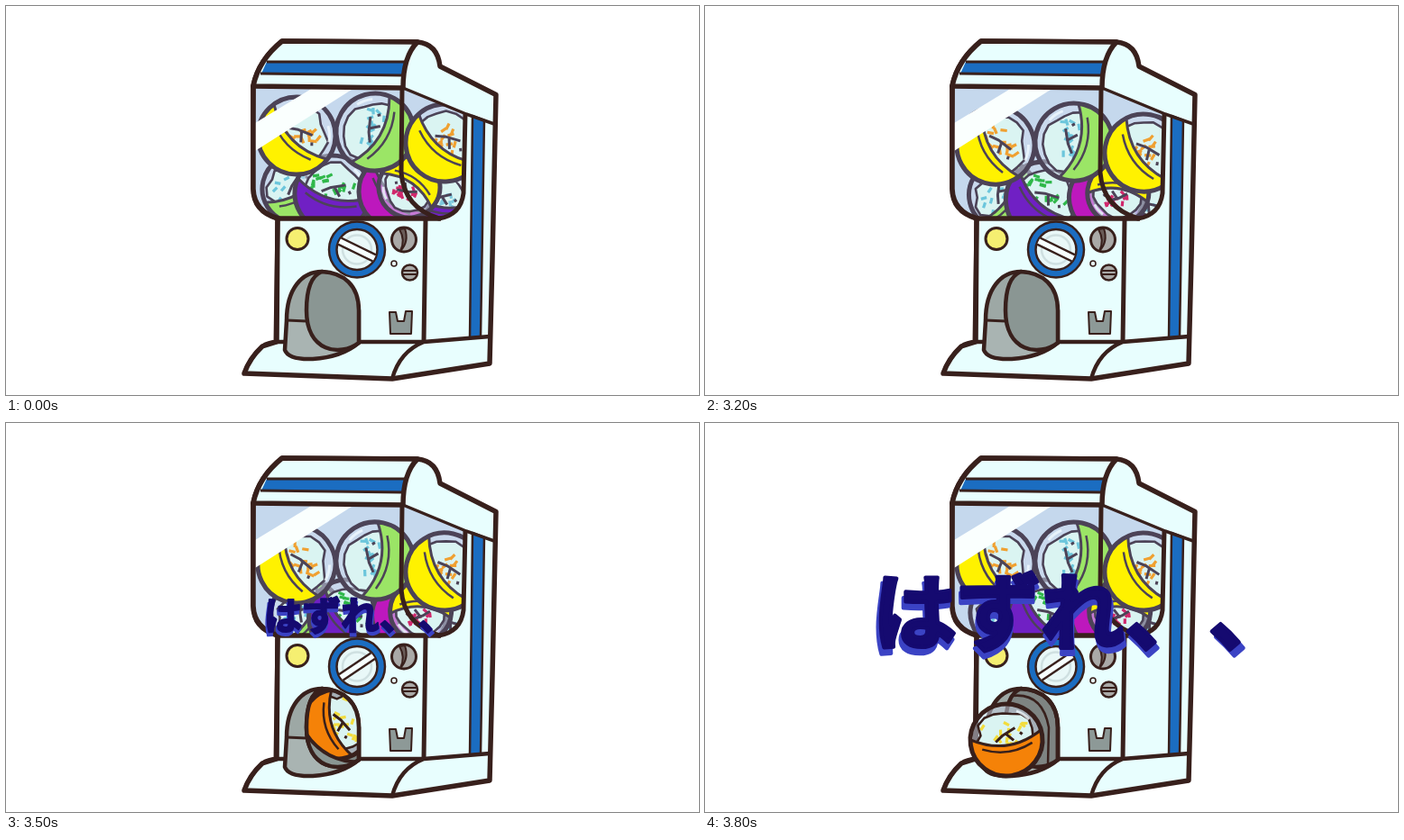
An HTML page with a canvas for the animation above (5.8 s loop, 768 by 432 pixels).

```html
<!DOCTYPE html>
<html lang="ja">
<head>
<meta charset="utf-8">
<title>Capsule machine</title>
<style>
html, body { margin: 0; width: 100%; height: 100%; overflow: hidden; background: #fff; }
canvas { display: block; width: 768px; height: 432px; }
</style>
</head>
<body>
<canvas id="stage" width="768" height="432"></canvas>
<script>
const ctx = document.getElementById('stage').getContext('2d');
const LOOP = 5800, START = 3000, STEP = 100, LAST = 9;
const DROP = 4, SPEAK = 5; // steps at which the prize and the caption appear
const INK = '#38201c', SHADE = '#4c4357', FLAP = '#8a9693';
const BODY = '#e8fefe', BLUE = '#1b6dc1', PALE = '#c5d8ed';
const YELLOW = '#fff200', GREEN = '#9be566', PURPLE = '#7020c4', MAGENTA = '#bd18bd';

// Capsules before the knob turns; the upper row comes last
const CAPSULES = [
  { color: GREEN, speck: '#6cc6dc', x: 322, y: 203, r: 38, angle: -32 },
  { color: PURPLE, speck: '#7cc8dc', x: 482, y: 218, r: 36, angle: 10 },
  { color: PURPLE, speck: '#2fb84a', x: 362, y: 208, r: 42, angle: 15 },
  { color: MAGENTA, speck: '#d0286c', x: 432, y: 206, r: 41, angle: 44 },
  { color: YELLOW, speck: '#d0286c', x: 447, y: 201, r: 34, angle: -145 },
  { color: YELLOW, speck: '#f0a030', x: 322, y: 144, r: 43, angle: 46, upper: true },
  { color: GREEN, speck: '#6cc6dc', x: 409, y: 140, r: 43, angle: -60, upper: true },
  { color: YELLOW, speck: '#f0a030', x: 486, y: 152, r: 43, angle: 40, upper: true }
];
const MARKS = new Path2D('M-.3 .02L-.08 -.14L.28 -.3M.02 -.16L.2 .04M.4 -.16L.46 -.1');

const mix = (a, b, k) => a + (b - a) * k;

function shape(d, fill, width = 0, color = INK) {
  const p = new Path2D(d);
  if (fill) { ctx.fillStyle = fill; ctx.fill(p); }
  if (width) { ctx.strokeStyle = color; ctx.lineWidth = width; ctx.stroke(p); }
  return p;
}

function disc(x, y, r, fill, width = 0, color = INK) {
  ctx.beginPath();
  ctx.arc(x, y, r, 0, 7);
  if (fill) { ctx.fillStyle = fill; ctx.fill(); }
  if (width) { ctx.strokeStyle = color; ctx.lineWidth = width; ctx.stroke(); }
}

function line(x1, y1, x2, y2, width, color = INK) {
  ctx.beginPath();
  ctx.moveTo(x1, y1);
  ctx.lineTo(x2, y2);
  ctx.strokeStyle = color;
  ctx.lineWidth = width;
  ctx.stroke();
}

function random(seed) {
  return () => (seed = (seed * 16807) % 2147483647) / 2147483647;
}

function paper(r, speck, ink, rnd) {
  ctx.beginPath();
  ctx.moveTo(-.8 * r, .2 * r);
  for (let i = 0; i <= 10; i++) {
    const a = Math.PI * (1 + i / 10), d = r * (.68 + .18 * rnd());
    ctx.lineTo(d * Math.cos(a) * 1.05, d * Math.sin(a));
  }
  ctx.lineTo(.8 * r, .2 * r);
  ctx.fillStyle = '#daf4f2';
  ctx.fill();
  ctx.strokeStyle = ink;
  ctx.lineWidth = 2.6;
  ctx.stroke();
  for (let i = 0; i < 16; i++) {
    const x = mix(-.58, .58, rnd()) * r, y = mix(-.5, .15, rnd()) * r, a = rnd() * 3;
    line(x, y, x + Math.cos(a) * r * .17, y + Math.sin(a) * r * .17, 3.2, speck);
  }
  ctx.save();
  ctx.scale(r, r);
  ctx.strokeStyle = ink;
  ctx.lineWidth = 3 / r;
  ctx.stroke(MARKS);
  ctx.restore();
}

function capsule({ x, y, r, angle, color, speck }, ink, seed) {
  ctx.save();
  ctx.translate(x, y);
  ctx.rotate(angle * Math.PI / 180);
  ctx.save();
  ctx.beginPath();
  ctx.arc(0, 0, r, 0, 7);
  ctx.clip();
  ctx.fillStyle = 'rgba(205,220,238,.5)';
  ctx.fill();
  paper(r, speck, ink, random(seed * 7919 + 101));

  // Colored half with its rim
  ctx.beginPath();
  ctx.moveTo(-r, -.15 * r);
  ctx.quadraticCurveTo(0, .45 * r, r, -.15 * r);
  ctx.lineTo(r, r);
  ctx.lineTo(-r, r);
  ctx.closePath();
  ctx.fillStyle = color;
  ctx.fill();
  ctx.strokeStyle = ink;
  ctx.lineWidth = 3;
  ctx.stroke();
  ctx.beginPath();
  ctx.moveTo(-.7 * r, .17 * r);
  ctx.quadraticCurveTo(0, .49 * r, .7 * r, .17 * r);
  ctx.lineWidth = 2.5;
  ctx.stroke();
  ctx.restore();

  // Glint on the clear half
  ctx.beginPath();
  ctx.arc(0, 0, r * .85, -1.1, -.6);
  ctx.strokeStyle = 'rgba(240,250,255,.8)';
  ctx.lineWidth = 3;
  ctx.stroke();
  disc(0, 0, r, null, 5, ink);
  ctx.restore();
}

// Upper capsules sink, lower ones slide right; each rolls on in its own direction
function tumble(c, k) {
  const slide = c.upper ? 0 : 17 * Math.sin(Math.PI * (c.x - 275) / 235);
  const turn = Math.sign(c.angle) * (c.upper ? 18 : 31);
  return { ...c, x: c.x + slide * k, y: c.y + (c.upper ? 13 : 8) * k, angle: c.angle + turn * k };
}

function cabinet() {
  shape('M306 39L456 40Q478 42 481 67L543 98.5L539 280L536 397L428 414L264 408Q270 391 284 378L300 373L301 236Q274 228 274 203L274 88Q280 60 306 39Z', BODY, 5.5);
  shape('M517 122L530 127L526 367L514 369Z', BLUE, 2.5);
}

function glass(k) {
  const pane = shape('M277 91L440 92L510 120L508 208Q505 235 480 236L302 236Q275 228 275 203Z', PALE);
  ctx.save();
  ctx.clip(pane);
  CAPSULES.forEach((c, i) => capsule(tumble(c, k), SHADE, i + 1));
  shape('M276 130L340 91L386 91L276 161Z', '#fafffe');
  ctx.restore();
}

function frame() {
  const lid = 'M306 39L456 40Q440 56 440 91L274 89Q280 60 306 39Z';
  shape(lid, BODY);
  shape('M289 62L443 62L440 77L283 75Z', BLUE);
  line(289, 62, 444, 62, 3);
  line(282, 75, 440, 77, 3);
  shape(lid, null, 5.5);
  shape('M440 91L510 120L541 131', null, 3.5);
  shape('M439 92L438 185Q441 224 480 236Q504 232 507 208L509 120', null, 5);
  shape('M274 88L274 203Q275 228 302 236L482 236', null, 5.5);
  shape('M301 236L299 374M465 237L463 373', null, 5);
  shape('M264 408Q270 391 284 378Q290 373 301 373L463 373L536 367M428 414Q436 384 463 373', null, 4.5);
}

function controls(angle) {
  disc(323, 258.5, 12, '#f5ef71', 3);

  disc(389, 270.5, 31, BLUE, 2.5);
  disc(389, 270.5, 22.5, '#e9f8f8', 2.5);
  disc(389, 270.5, 16, null, 2.5, '#cfe0e1');
  ctx.save();
  ctx.translate(389, 270.5);
  ctx.rotate(angle * Math.PI / 180);
  ctx.fillStyle = '#f7ffff';
  ctx.fillRect(-21.5, -4, 43, 8);
  line(-21.5, -4, 21.5, -4, 2.4);
  line(-21.5, 4, 21.5, 4, 2.4);
  ctx.restore();

  disc(441, 259.5, 13.5, '#aaa9a7', 3);
  shape('M436 248Q443 260 437 272Q447 262 442 247Z', '#6a5c58', 2);
  disc(430, 286, 3, BODY, 1.6);
  disc(447.5, 296, 8.5, '#aaa9a7', 2.5);
  shape('M440 294L455 294M440 298L455 298', null, 2);
  shape('M425 340L432 340L434 350L441 350L443 339L450 339L449 364L426 364Z', '#8d9997', 2);
}

function chute(step) {
  const housing = 'M350 295C328 295 311 314 311 349L309 382Q313 393 340 392Q372 390 391 374L391 338Q386 299 350 295Z';
  const flap = 'M350 295C374 296 391 310 391 338L391 374C370 390 333 384 333 338C333 316 337 300 350 295Z';
  shape(housing, '#9da8a5');
  shape('M311 349L333 350Q338 374 362 382L388 376Q372 390 340 392Q313 393 309 384Z', '#a9b4b2');
  shape(housing, null, 4.5);
  line(311, 349, 333, 350, 3);
  const open = step - DROP;
  const doorway = shape(flap, open < 0 ? FLAP : '#7e8482', 4.5);
  if (open < 0) return;

  const u = open / (LAST - DROP), sliding = open < 3;
  if (!sliding) {
    shape('M340 303Q374 299 381 338L380 380', null, 2.5);
    doorway.rect(280, 280, 111, 130);
  }
  ctx.save();
  ctx.clip(doorway);
  capsule({
    x: 369 - 35 * u ** 3,
    y: mix(303, 352, 1 - (1 - u) ** 2),
    r: 38 + 2 * u,
    angle: 92 - 100 * u ** 1.8,
    color: '#f58208',
    speck: '#f2dc3c'
  }, INK, 12);
  if (sliding) {
    const d = 21 * open ** 1.5;
    shape(`M332 ${285 + d}Q355 ${319 + d} 396 ${317 + d}L396 392L325 392Z`, FLAP, 4);
  }
  ctx.restore();
  if (sliding) shape(flap, null, 4.5);
  else shape('M350 295C374 296 391 310 391 338L391 374', null, 4.5);
}

// Every character takes one full em
function lettering(x, y, size, color) {
  ctx.font = `900 ${size}px "Noto Sans CJK JP", "Noto Sans CJK", sans-serif`;
  ctx.fillStyle = ctx.strokeStyle = color;
  ctx.lineWidth = size * .045;
  [...'はずれ、、'].forEach((ch, i) => {
    ctx.fillText(ch, x + i * size, y);
    ctx.strokeText(ch, x + i * size, y);
  });
}

function caption(step) {
  if (step < SPEAK) return;
  const k = ((step - SPEAK) / (LAST - SPEAK)) ** 1.78;
  const x = mix(295, 186, k), y = mix(229, 245, k), size = mix(38, 93, k);
  lettering(x - size * .035, y + size * .075, size * 1.02, '#3b43c4');
  lettering(x, y, size, '#150a70');
}

function draw(t) {
  const step = t < START ? 0 : Math.min(LAST, 1 + Math.floor((t - START) / STEP));
  ctx.fillStyle = '#fff';
  ctx.fillRect(0, 0, 768, 432);
  ctx.lineJoin = 'round';
  cabinet();
  glass(1 - Math.exp(-((step / 2) ** 1.6)));
  frame();
  controls(26 + 60 * Math.min(step, 5));
  chute(step);
  caption(step);
}

const t0 = performance.now();
function tick() {
  draw((performance.now() - t0) % LOOP);
  requestAnimationFrame(tick);
}
tick();
</script>
</body>
</html>
```
